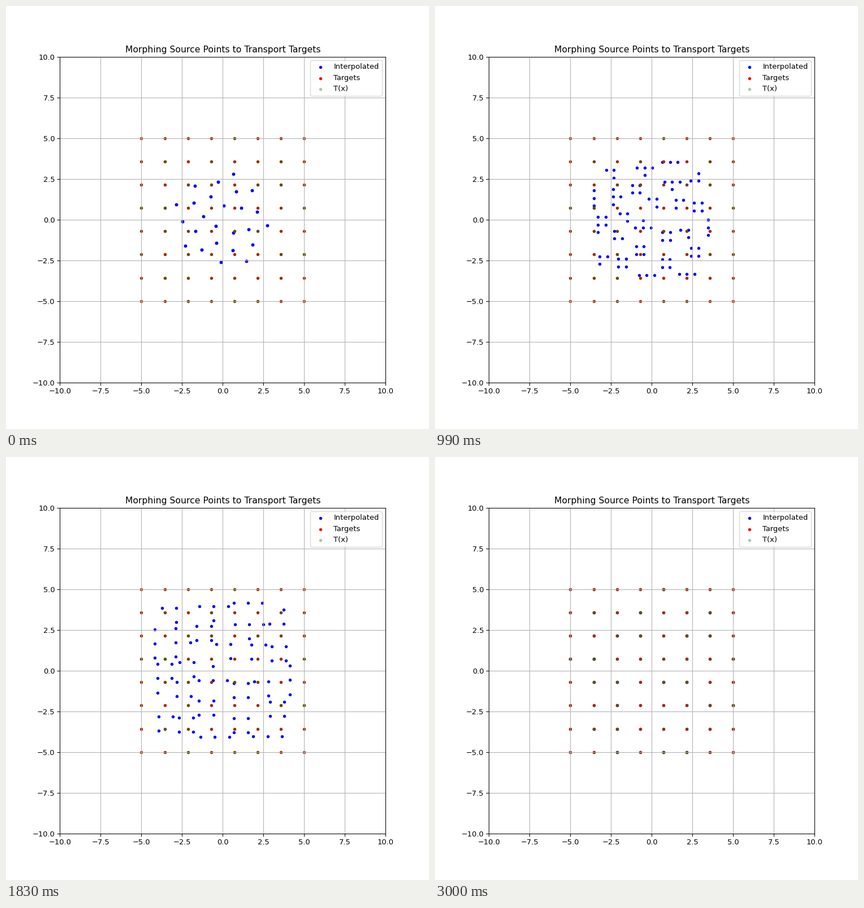
Recreate the animation shown at these times as a matplotlib script. Size 748 px wide and 748 px high, loop 3.03 s.

```python
import numpy as np
import matplotlib.pyplot as plt
from matplotlib.animation import FuncAnimation

FRAMES, INTERVAL = 101, 30
N_SRC, SIDE, RADIUS = 25, 8, 3.0
EPS = 1e-9


def sunflower(n, radius):
    """Points of a golden-angle spiral filling a disc."""
    i = np.arange(1, n + 1)
    r = radius * np.sqrt(i / n)
    a = np.pi * (np.sqrt(5) - 1) * i
    return np.column_stack([r * np.cos(a), r * np.sin(a)])


def lattice(side, half):
    axis = np.linspace(-half, half, side)
    return np.stack(np.meshgrid(axis, axis), axis=-1).reshape(-1, 2)


def relax(dist, parent, options):
    """Take strictly shorter options (one column per node); report any gain."""
    best = options.min(axis=0)
    better = best < dist - EPS
    dist[better] = best[better]
    parent[better] = options.argmin(axis=0)[better]
    return better.any()


def transport(cost):
    """Optimal plan between uniform masses, by successive shortest paths."""
    n, m = cost.shape
    flow = np.zeros((n, m), dtype=int)
    supply, demand = np.full(n, m), np.full(m, n)
    while supply.any():
        near = np.where(supply > 0, 0.0, np.inf)
        far = np.full(m, np.inf)
        back, prev = np.full(n, -1), np.full(m, -1)
        while relax(far, prev, near[:, None] + cost):
            if not relax(near, back, np.where(flow > 0, far - cost, np.inf).T):
                break

        end = j = np.where(demand > 0, far, np.inf).argmin()
        add, cut = [], []
        while True:
            i = prev[j]
            add.append((i, j))
            j = back[i]
            if j < 0:
                break
            cut.append((i, j))
        step = min([supply[i], demand[end]] + [flow[c] for c in cut])
        for c in add:
            flow[c] += step
        for c in cut:
            flow[c] -= step
        supply[i] -= step
        demand[end] -= step
    return flow


source = sunflower(N_SRC, RADIUS)
target = lattice(SIDE, 5)
cost = ((source[:, None] - target[None]) ** 2).sum(axis=-1)
rows, cols = np.nonzero(transport(cost))
start, goal = source[rows], target[cols]

fig, ax = plt.subplots(figsize=(8, 8), dpi=93.5)
moving = ax.scatter(*start.T, s=10, color="blue", label="Interpolated")
ax.scatter(*target.T, s=10, color="red", label="Targets")
ax.scatter(*goal.T, s=10, color="green", alpha=0.3, label="T(x)")
ax.set_xlim(-10, 10)
ax.set_ylim(-10, 10)
ax.set_aspect("equal")
ax.set_title("Morphing Source Points to Transport Targets")
ax.grid(True)
ax.legend(loc="upper right")


def update(frame):
    t = frame / (FRAMES - 1)
    moving.set_offsets((1 - t) * start + t * goal)
    return (moving,)


anim = FuncAnimation(fig, update, frames=FRAMES, interval=INTERVAL,
                     repeat=True, repeat_delay=0)
plt.show()
```
